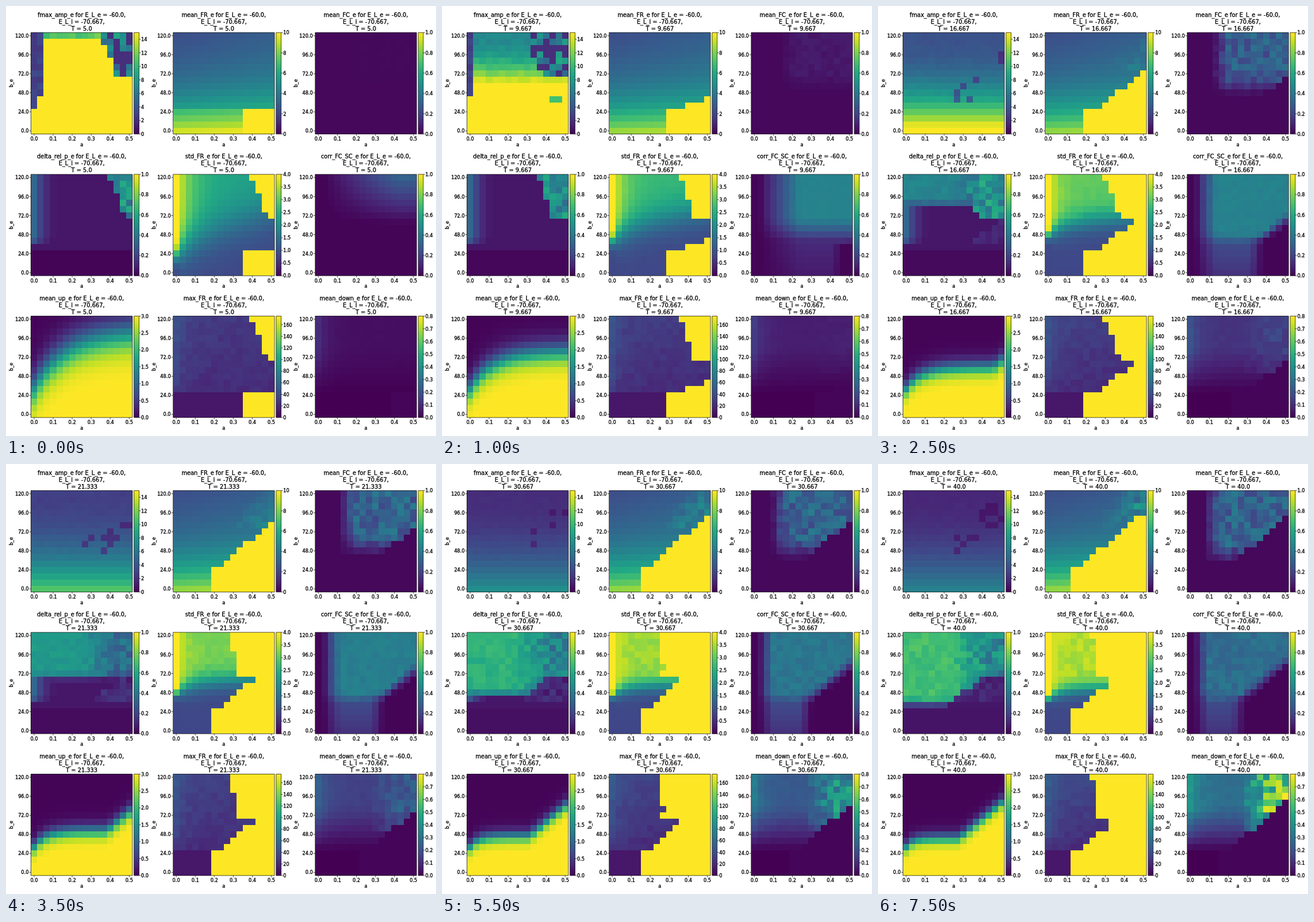
Write an HTML page with a canvas that moves like this. It is 748x748 px and loops after 8 s.

```html
<!DOCTYPE html>
<html lang="en">
<head>
<meta charset="utf-8">
<title>Parameter sweep</title>
<style>
html, body { margin: 0; width: 100%; height: 100%; overflow: hidden; background: #fff; }
canvas, svg { position: absolute; left: 0; top: 0; width: 748px; height: 748px; }
text { font-family: "DejaVu Sans", sans-serif; font-size: 8.2px; stroke: #000; stroke-width: .32px; }
.title { font-size: 9.85px; text-anchor: middle; }
.mid { text-anchor: middle; }
.end { text-anchor: end; }
</style>
</head>
<body>
<canvas id="heat" width="748" height="748"></canvas>
<svg id="axes" viewBox="0 0 748 748"></svg>
<script>
const N = 16, STEP = 500, SIZE = 176.5, CELL = SIZE / N;
const VIRIDIS = ['440154', '482475', '414487', '355f8d', '2a788e', '21918c', '22a884', '44bf70', '7ad151', 'bddf26', 'fde725']
  .map(h => [0, 2, 4].map(i => parseInt(h.slice(i, i + 2), 16)));

const clip = x => Math.max(0, Math.min(1, x));
const sig = x => 1 / (1 + Math.exp(-x));
function color(v) {
  const x = clip(v) * 10, i = Math.min(9, Math.floor(x)), f = x - i;
  return `rgb(${VIRIDIS[i].map((a, j) => Math.round(a + (VIRIDIS[i + 1][j] - a) * f))})`;
}
function noise(c, r, s) {
  const x = Math.sin(c * 12.9898 + r * 78.233 + s * 37.719) * 43758.5453;
  return x - Math.floor(x);
}

// k is the step of T; most parameters settle exponentially with it.
let k = 0;
const settle = (from, to, tau) => to + (from - to) * Math.exp(-k / tau);

// Diagonal border of the saturated corner: first column in row r, and its inverse.
const base = () => settle(11, 3.8, 6);
const slope = () => settle(13.2, 1.2, 1);
const front = r => r >= 12 ? base() - .94 : base() + slope() * (12 - r);
const frontRow = c => 12 - (c - base()) / slope();

// Border that also includes the bursts at the top right.
function burst(r) {
  const upper = settle(11.8, 6.8, 5) + .45 * clip(1.6 - k / 8) * r + 2.5 * Math.max(0, r - 6);
  return Math.min(upper + (r < 7 ? noise(r, k, 4) - .5 : 0), front(r));
}

function fmax(c, r, h) {
  const edge = c === 0 ? 12 - k : c === 1 ? 10 - 5 * k : 0;
  if (k < 3 && r < edge) return 2.4 + h;
  if (k < 3 && r < 7 && c > burst(r) - 1.5) return h > .5 ? 9 * h : 2;
  const power = settle(.3, 2.2, 1);
  const v = settle(11, 1.5, 3.5) + settle(65, 4.8, 2.4) * Math.pow(r / 15, power);
  const stray = k > 1 && c > 7 && r < 11 && Math.abs(c - front(r) + 1) < 2.5 && h > .72;
  return stray ? v * .5 : v + settle(2, .2, 2) * (h - .5) * (r < 11);
}
function meanRate(c, r, h) {
  if (c >= front(r)) return 10;
  if (r === 12 && c >= front(13)) return 8.6;
  const v = 2.4 + .12 * r + .0012 * r ** 3 + .04 * c + (r > 11 ? Math.exp(-k) : 0);
  return v + (r < 6 ? .17 * k * h * clip((c - 8) / 5) * clip((c + 8 - front(r)) / 4) : 0);
}
function meanFC(c, r, h) {
  if (c > front(r) + 1) return .02;
  const fx = clip((c - 4.2 + .14 * k) / 2.5), fy = clip((8.5 + .16 * k - r) / 3);
  return .02 + .35 * sig((k - 3.3) * 1.3) * fx * fy * (.55 + .6 * h);
}
function deltaPower(c, r, h) {
  const low = r < 12 ? .06 : .01 + .003 * k;
  if (r > 6 && c > front(r) + 1) return r < 11 ? .06 + .1 * h : low;
  if (k < 6 && r < 7 && c >= burst(r)) return .35 + .3 * h;
  const left = r < 11 ? .33 * Math.exp(-c / 2) * clip((14 - r) / 5) : 0;
  const right = clip((c - 7) / 6);
  const flat = settle(.05, .75, 6) * (1 - .32 * right) * (1 + (.12 + .4 * right) * (h - .5));
  return Math.max(low, left, flat * sig((settle(-5.8, 12.2, 6) - r) / .3));
}
function stdRate(c, r, h) {
  if (c >= burst(r)) return 4;
  const flat = settle(2.3, 3.7, 7);
  const top = flat + (4.1 - flat) * Math.exp(-c / settle(2.5, .8, 5));
  const edge = settle(10.5, 6.5, 2) + .12 * k - settle(.35, 0, 4) * c + 1.7 * Math.exp(-c / 2);
  const width = settle(2, .7, 4) * (1 - .6 * Math.exp(-c));
  const grain = r < 7 && c > 1 ? .025 * k * (h - .5) : 0;
  return .85 + (top - .85) * sig((edge - r) / width) + grain;
}
function corr(c, r, h) {
  const fx = clip((c - .6) / settle(12, 2.2, 2.5));
  const fy = clip((settle(7.5, 12.3, 1.2) - r) / settle(8, 3, 2));
  const amp = .48 - .008 * k - .15 * Math.exp(-k) + .006 * k * (h - .5);
  const body = amp * fx * fy * clip((front(r) + 2.5 - c) / 2.5);
  const tail = r > 9 ? .22 * clip(k / 4) * (1 - Math.max(0, r - 11) * .08) : 0;
  return Math.max(.01, body, tail * fx * clip((settle(17, 8.2, 5) - c) / 2));
}
function meanUp(c, r) {
  const flat = settle(2, 9.8, 4);
  const curve = flat + (11 - flat) * Math.exp(-c / settle(5, 1, 5));
  const edge = Math.min(curve, frontRow(c) + .9);
  return .03 + 3 * sig((r - edge) / settle(1.6, .55, 3));
}
function maxRate(c, r, h) {
  if (c >= burst(r)) return 175;
  if (r > 11) return 11;
  return 20 + 14 * Math.exp(-c / 1.5) * clip((13 - r) / 4) + (8 + .6 * k) * clip(1 - r / 11) + 7 * (h - .3);
}
function meanDown(c, r, h) {
  if (c > front(r) + 1) return .01;
  const flat = .03 + .017 * k, left = .07 + .004 * k;
  const v = (flat + left * Math.exp(-c / 1.5)) * clip((11.6 - r) / 7) * (.95 + .1 * h);
  return v + (r < 9 ? .0027 * k * k * clip((c - 8) / 5) * (.2 + .8 * h) : 0);
}

const ticks = (step, n, d) => Array.from({ length: n }, (_, i) => (i * step).toFixed(d));
const PANELS = [
  ['fmax_amp_e', 15, ticks(2, 8, 0), fmax],
  ['mean_FR_e', 10, ticks(2, 6, 0), meanRate],
  ['mean_FC_e', 1, ticks(.2, 6, 1), meanFC],
  ['delta_rel_p_e', 1, ticks(.2, 6, 1), deltaPower],
  ['std_FR_e', 4, ticks(.5, 9, 1), stdRate],
  ['corr_FC_SC_e', 1, ticks(.2, 6, 1), corr],
  ['mean_up_e', 3, ticks(.5, 7, 1), meanUp],
  ['max_FR_e', 175, ticks(20, 9, 0), maxRate],
  ['mean_down_e', .8, ticks(.1, 9, 1), meanDown]
].map(([name, max, labels, value], i) =>
  ({ name, max, labels, value, x: 43.4 + 247.2 * (i % 3), y: 46.2 + 246.6 * Math.floor(i / 3) }));

const ctx = document.getElementById('heat').getContext('2d');
function cell(p, c, r, v) {
  const x = Math.round(p.x + c * CELL), y = Math.round(p.y + r * CELL);
  ctx.fillStyle = color(v / p.max);
  ctx.fillRect(x, y, Math.round(p.x + (c + 1) * CELL) - x, Math.round(p.y + (r + 1) * CELL) - y);
}
function draw() {
  ctx.fillStyle = '#fff';
  ctx.fillRect(0, 0, 748, 748);
  PANELS.forEach((p, i) => {
    for (let r = 0; r < N; r++)
      for (let c = 0; c < N; c++) cell(p, c, r, p.value(c, r, noise(c, r, i + k * .37)));
    const bar = ctx.createLinearGradient(0, p.y + SIZE, 0, p.y);
    VIRIDIS.forEach((_, j) => bar.addColorStop(j / 10, color(j / 10)));
    ctx.fillStyle = bar;
    ctx.fillRect(p.x + 179.3, p.y, 8.8, SIZE);
  });
  const T = 5 + 35 * k / 15, whole = Math.abs(T - Math.round(T)) < 1e-6;
  document.querySelectorAll('.time').forEach(e => e.textContent = 'T = ' + T.toFixed(whole ? 1 : 3));
}

function axes({ name, max, labels, x, y }) {
  const mid = x + SIZE / 2, end = y + SIZE;
  const text = (cls, tx, ty, s) => `<text class="${cls}" x="${tx}" y="${ty}">${s}</text>`;
  let lines = '', out = text('title', mid, y - 27.4, `${name} for E_L_e = -60.0,`) +
    text('title', mid, y - 15.5, 'E_L_i = -70.667,') + text('title time', mid, y - 3.6, '');
  for (let i = 0; i < 6; i++) {
    const d = CELL * (.5 + 3 * i);
    lines += `M${x + d} ${end}v3M${x} ${y + d}h-3`;
    out += text('mid', x + d, end + 11.3, (i / 10).toFixed(1)) +
      text('end', x - 4, y + d + 3.1, (120 - 24 * i).toFixed(1));
  }
  labels.forEach(s => {
    const ty = end - SIZE * s / max;
    lines += `M${x + 188.1} ${ty}h3`;
    out += text('', x + 191.6, ty + 3.1, s);
  });
  out += text('mid', mid, end + 21, 'a');
  out += `<text class="mid" transform="translate(${x - 31} ${y + SIZE / 2}) rotate(-90)">b_e</text>`;
  lines += `M${x} ${y}h${SIZE}v${SIZE}h${-SIZE}zM${x + 179.3} ${y}h8.8v${SIZE}h-8.8z`;
  return out + `<path d="${lines}" fill="none" stroke="#000" stroke-width=".7"/>`;
}
document.getElementById('axes').innerHTML = PANELS.map(axes).join('');

const start = performance.now();
let shown = -1;
function tick(now) {
  k = Math.floor(Math.max(0, now - start) / STEP) % N;
  if (k !== shown) {
    shown = k;
    draw();
  }
  requestAnimationFrame(tick);
}
tick(start);
</script>
</body>
</html>
```
